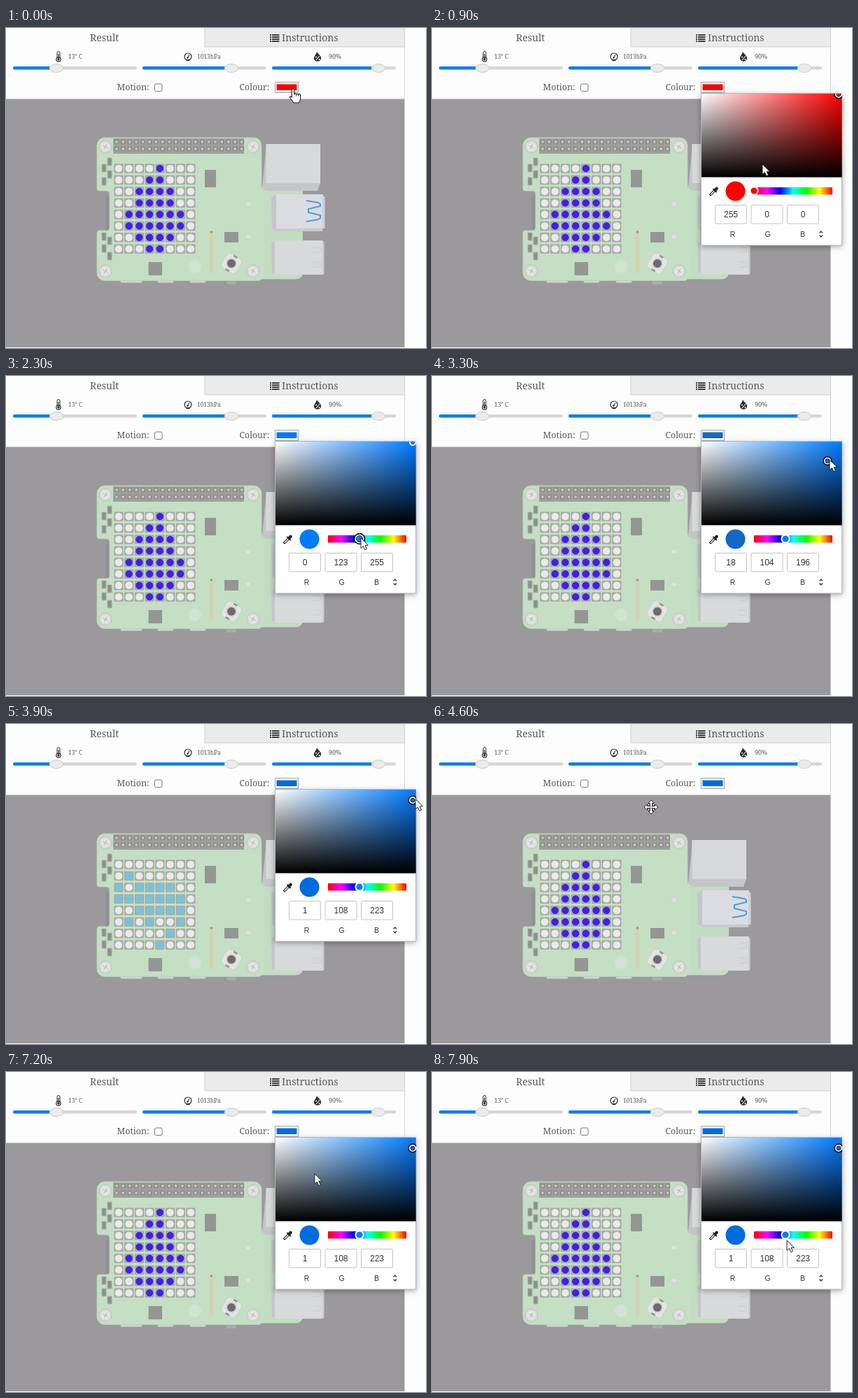
An HTML page with a canvas that plays this animation: 600x458 px, repeating every 8000 ms.

```html
<!DOCTYPE html>
<html lang="en">
<head>
<meta charset="utf-8">
<title>Board emulator</title>
<style>
html, body { margin: 0; width: 100%; height: 100%; overflow: hidden; background: #fdfdfd; }
canvas { display: block; width: 600px; height: 458px; }
</style>
</head>
<body>
<canvas id="stage"></canvas>
<script>
const W = 600, H = 458, LOOP = 8000, STEP = 100;
const SERIF = '"Noto Serif", serif', SANS = '"Liberation Sans", Arial, sans-serif';
const canvas = document.getElementById('stage');
const dpr = window.devicePixelRatio || 1;
canvas.width = W * dpr;
canvas.height = H * dpr;
const c = canvas.getContext('2d');

// LED rows as bit masks, leftmost LED is the high bit
const TREE = [0x08, 0x18, 0x3c, 0x3c, 0x7e, 0x7e, 0x3c, 0x18];
const FISH = [0x00, 0x40, 0xbc, 0xfe, 0x3e, 0x52, 0x04, 0x08];

// Pointer path: time, x, y
const PATH = [
  [0, 410, 87.5], [300, 410, 87.5], [900, 472, 195], [1600, 525, 237], [1800, 522, 235],
  [2200, 507, 232], [2400, 507, 232], [2800, 574, 106], [3300, 568, 120],
  [3700, 585, 107.5], [3900, 585, 107.5], [4600, 313, 119], [5200, 302, 150],
  [5700, 322, 148], [6400, 367, 80.5], [6700, 398, 84], [6900, 398, 84],
  [7600, 507, 241], [8000, 507, 241]
];

const clamp = (v, a, b) => Math.max(a, Math.min(b, v));

function pointer(t) {
  let i = 1;
  while (i < PATH.length - 1 && PATH[i][0] < t) i++;
  const [t0, x0, y0] = PATH[i - 1], [t1, x1, y1] = PATH[i];
  const k = clamp((t - t0) / (t1 - t0), 0, 1), e = k * k * (3 - 2 * k);
  return { x: x0 + (x1 - x0) * e, y: y0 + (y1 - y0) * e };
}

function toRgb(h, s, v) {
  const f = n => {
    const k = (n + h / 60) % 6;
    return Math.round(255 * v * (1 - s * clamp(Math.min(k, 4 - k), 0, 1)));
  };
  return [f(5), f(3), f(1)];
}
const css = rgb => `rgb(${rgb})`;

function stateAt(t) {
  const open = (t >= 400 && t < 4300) || t >= 6900;
  const p = pointer(t);
  let hueX = 460, mark = { x: 583, y: 94 };
  if (t >= 1900) hueX = pointer(Math.min(t, 2300)).x - 2;
  if (t >= 2800) {
    const d = pointer(Math.min(t, 3700));
    mark = { x: d.x - 3, y: d.y + 1.5 };
  }
  const hue = clamp(211 + (505 - hueX) * 149 / 45, 0, 360) % 360;
  const sat = clamp((mark.x - 385) / 198, 0, 1);
  const val = clamp(1 - (mark.y - 94) / 119, 0, 1);
  const onHue = t >= 1900 && t < 2800;
  const phase = t % 2400;
  return { t, open, p, hueX, mark, hue, onHue, rgb: toRgb(hue, sat, val), fish: phase >= 950 && phase < 2150 };
}

function rect(x, y, w, h, fill, r = 0, line) {
  c.beginPath();
  c.roundRect(x, y, w, h, r);
  if (fill) { c.fillStyle = fill; c.fill(); }
  if (line) { c.strokeStyle = line; c.lineWidth = 1; c.stroke(); }
}
function disc(x, y, r, fill, line, lw = 1) {
  c.beginPath();
  c.arc(x, y, r, 0, 7);
  if (fill) { c.fillStyle = fill; c.fill(); }
  if (line) { c.strokeStyle = line; c.lineWidth = lw; c.stroke(); }
}
function poly(pts, fill, line, lw = 1) {
  c.beginPath();
  for (let i = 0; i < pts.length; i += 2) c.lineTo(pts[i], pts[i + 1]);
  if (fill) { c.closePath(); c.fillStyle = fill; c.fill(); }
  if (line) { c.strokeStyle = line; c.lineWidth = lw; c.stroke(); }
}
function text(s, x, y, size, family = SERIF, align = 'left', fill = '#5a5a5a') {
  c.font = `${size}px ${family}`;
  c.textAlign = align;
  c.fillStyle = fill;
  c.fillText(s, x, y);
}

function slider(x, thumb) {
  rect(x, 55, 177, 4.5, '#d6d6d6', 2.2);
  rect(x, 55, thumb - x, 4.5, '#0b7fe9', 2.2);
  c.beginPath();
  c.ellipse(thumb, 57.5, 9.8, 6, 0, 0, 7);
  c.fillStyle = '#ebebeb';
  c.fill();
  c.strokeStyle = '#cbcbcb';
  c.lineWidth = 1;
  c.stroke();
}

function icons() {
  const ink = '#2a2a2a';
  rect(73, 33.5, 4, 11, '#fff', 2, ink);
  disc(75, 45, 3.2, '#fff', ink, 1.2);
  disc(75, 45, 1.7, ink);
  rect(74.4, 37, 1.2, 8, ink);

  disc(260, 41, 5, '#fff', ink, 1.2);
  poly([259.5, 42.5, 262, 38.5], null, ink, 1.1);
  disc(259.5, 42.5, 1.2, ink);
  rect(257.5, 45, 5, 2, ink);

  c.beginPath();
  c.moveTo(444, 34);
  c.bezierCurveTo(446, 38, 451, 40, 450, 44);
  c.bezierCurveTo(449, 49, 441, 49, 440, 44);
  c.bezierCurveTo(439.5, 41, 443, 38, 444, 34);
  c.fillStyle = ink;
  c.fill();
  poly([443, 46, 448, 40], null, '#fff', 1.1);
  disc(443, 41.5, 1, '#fff');
  disc(447.5, 45, 1, '#fff');

  for (let y = 9; y < 19; y += 3) {
    rect(377, y, 2, 2, '#3c3c3c');
    rect(380, y, 10.5, 2, '#3c3c3c');
  }
}

function header(rgb) {
  rect(0, 0, W, H, '#fdfdfd');
  rect(284, 0, 285, 27, '#ebebeb');
  rect(283.5, 0, 1, 27, '#cfcfcf');
  rect(284, 26.5, 286, 1, '#cfcfcf');
  rect(569, 0, 1, 457, '#d2d2d2');
  text('Result', 120, 19, 14);
  text('Instructions', 394, 19, 14);
  icons();
  text('13° C', 89, 44, 8.4);
  text('1013hPa', 273, 44, 8.4);
  text('90%', 461, 44, 9);
  slider(10, 72);
  slider(195, 322);
  slider(380, 532);
  text('Motion:', 158.5, 89, 12.5);
  text('Colour:', 333.5, 89, 12.3);
  rect(212.5, 80, 10.5, 10.5, '#fff', 2, '#7a7a7a');
  rect(384.5, 77.5, 33, 15, '#fcfcfc', 0, '#a2a2a2');
  rect(386.5, 80.5, 29, 8.5, css(rgb));
}

function screw(x, y) {
  disc(x, y, 9, '#d9dbd9', '#bcc3bc');
  disc(x, y, 6, '#e5e6e5');
  poly([x - 3.5, y - 2, x + 3.5, y + 2], null, '#b9bbb9', 1.3);
  poly([x - 2, y + 3.5, x + 2, y - 3.5], null, '#b9bbb9', 1.3);
}

function ports() {
  poly([372, 166, 366, 229, 372, 232, 376, 222], '#c3c4c5');
  poly([372, 222, 366, 229, 372, 233, 445, 233, 449, 222], '#c5c6c7');
  rect(371.5, 166, 77.5, 56, '#d8d9da');

  poly([387, 238, 379, 242, 380, 287, 387, 291], '#c4c6c8');
  poly([385, 285, 380, 288, 388, 291, 452, 291, 453, 285], '#c8c9cb');
  rect(386, 238, 67, 49, '#dbdcdf', 1);
  rect(452, 241, 3.5, 46, '#cfd1d4');
  poly([429, 247, 446, 250, 449, 252, 449, 255, 432, 259, 432, 264, 449, 268, 449, 272, 446, 274, 429, 277], null, '#4b9bdc', 2);

  poly([386, 304, 379, 307, 380, 350, 387, 353], '#c4c6c8');
  rect(384, 304, 69, 49, '#d8dadc', 1);
  rect(452, 306, 2.5, 46, '#cbcdd0');
  for (const y of [314, 335]) poly([438, y, 449, y, 449, y + 7, 438, y + 7], null, '#c8cacc');
}

function chips() {
  const dark = '#949694';
  [[145, 186], [137, 195], [145, 204], [137, 214],
   [137, 293], [145, 299], [137, 310], [145, 321]].forEach(([x, y]) => rect(x, y, 6, 11, '#8c908c', 0, '#aab2aa'));
  rect(284, 203, 16, 25, dark);
  rect(312, 292, 20, 15, dark);
  rect(203.5, 335, 19.5, 19, dark);
  rect(342, 248, 8, 7, '#dbe2db', 0, '#c6d2c6');
  rect(342, 295, 8, 7, '#dbe2db', 0, '#c6d2c6');
  rect(290.5, 290, 6, 60, '#d2d3b4');
  for (let y = 292; y < 350; y += 4.6) disc(293.5, y, 1.4, y < 293 ? '#888' : '#d9cf9f');
  disc(270, 342, 9, '#d3e3d3');

  c.save();
  c.translate(322, 337);
  c.rotate(0.55);
  rect(-12, -12, 24, 24, '#e4e5e3', 5, '#c9d3c9');
  for (let i = 0; i < 2; i++) {
    c.rotate(Math.PI);
    rect(-3, -12.5, 6, 2.5, '#8f938f');
  }
  c.restore();
  disc(322, 337, 8, '#d3d4d2');
  disc(322, 337, 6, '#6a6b6a');
}

function leds(fish, t) {
  const rows = fish ? FISH : TREE;
  const lit = !fish ? '#421eea' : t < 2400 ? '#f94b38' : '#70c4e6';
  for (let r = 0; r < 8; r++) for (let k = 0; k < 8; k++) {
    const x = 161 + k * 14.7, y = 201 + r * 16.45;
    rect(x - 6, y - 6, 12, 12, '#b0b4ae', 0, '#9ca199');
    disc(x, y, 5.2, rows[r] & (128 >> k) ? lit : '#ebeaea');
  }
}

function board(s) {
  rect(0, 101.5, 569, 355.5, '#9b999b');
  rect(362, 226, 62, 133.5, '#c2ddc1', [0, 0, 9, 0]);
  for (const [x, w] of [[164, 30], [217, 22], [263, 22]]) rect(x, 359, w, 5.5, '#d4d6d5', 1, '#bcbebd');
  rect(315, 360, 14, 7, '#aaaaac', 1);
  rect(143, 240, 8, 49, '#8f9092');

  c.beginPath();
  c.moveTo(140, 157);
  c.arcTo(365, 157, 365, 170, 11);
  c.arcTo(365, 361.5, 350, 361.5, 4);
  c.arcTo(130, 361.5, 130, 345, 11);
  c.lineTo(130, 293);
  c.arcTo(130, 290, 134, 290, 3);
  c.arcTo(148, 290, 148, 280, 4);
  c.arcTo(148, 233, 140, 233, 4);
  c.arcTo(130, 233, 130, 228, 3);
  c.arcTo(130, 157, 141, 157, 11);
  c.closePath();
  c.fillStyle = '#c4dfc3';
  c.fill();
  c.strokeStyle = '#b8d2b7';
  c.lineWidth = 1;
  c.stroke();
  rect(362, 230, 6, 129, '#c4dfc3');

  rect(153, 158, 187, 22, '#a0a19f');
  for (let i = 0; i < 20; i++) for (const y of [163, 173]) {
    const x = 158 + i * 9.4;
    rect(x - 3.5, y - 3.5, 7, 7, '#8f908e');
    rect(x - 1.5, y - 1.5, 3, 3, '#d2cfbd');
  }
  for (const x of [142, 353]) for (const y of [170, 348]) screw(x, y);
  chips();
  leds(s.fish, s.t);
  ports();
}

function ring(x, y, r, fill, focus) {
  if (focus) disc(x, y, r + 2.5, '#111');
  disc(x, y, r + 0.8, '#fff');
  disc(x, y, r - 1.2, fill, focus ? '#111' : null, 0.8);
}

function picker(s) {
  const fill = css(s.rgb), pure = css(toRgb(s.hue, 1, 1));
  c.save();
  c.shadowColor = 'rgba(0,0,0,.35)';
  c.shadowBlur = 8 * dpr;
  c.shadowOffsetY = 2 * dpr;
  rect(384, 93.5, 202, 217.5, '#fff');
  c.restore();
  rect(384.5, 93.5, 201, 217.5, null, 0, '#b5b5b5');

  const g = c.createLinearGradient(385, 0, 585, 0);
  g.addColorStop(0, '#fff');
  g.addColorStop(1, pure);
  rect(385, 94, 200.5, 119.5, g);
  const b = c.createLinearGradient(0, 94, 0, 213);
  b.addColorStop(0, 'rgba(0,0,0,0)');
  b.addColorStop(1, '#000');
  rect(385, 94, 200.5, 119.5, b);
  c.save();
  c.beginPath();
  c.rect(385, 94, 201, 119.5);
  c.clip();
  ring(Math.min(s.mark.x, 581), Math.max(s.mark.y, 95), 4.3, fill, !s.onHue);
  c.restore();

  // Eyedropper
  c.lineCap = 'round';
  poly([398, 238.5, 403, 233.5], null, '#222', 3.6);
  poly([398.3, 238.2, 403, 233.5], null, '#fff', 1.4);
  poly([402, 230.5, 406, 234.5], null, '#222', 2);
  poly([404.5, 232, 406.7, 229.8], null, '#222', 4.2);
  c.lineCap = 'butt';

  disc(433.5, 233.5, 14, fill);
  const h = c.createLinearGradient(460, 0, 572, 0);
  for (let i = 0; i <= 6; i++) h.addColorStop(i / 6, `hsl(${360 - i * 60},100%,50%)`);
  rect(460, 228, 112, 10.5, h, 1);
  ring(s.hueX, 233, 5.8, pure, s.onHue);

  s.rgb.forEach((v, i) => {
    const x = 404.5 + i * 51.5;
    rect(x, 253.5, 45, 26.5, '#fff', 1, '#c4c4c4');
    text(v, x + 22.5, 271, 12, SANS, 'center', '#333');
    text('RGB'[i], 429.5 + i * 50, 298.5, 10.5, SANS, 'center', '#333');
  });
  poly([553.5, 293.5, 555.8, 291, 558, 293.5], null, '#333', 1.2);
  poly([553.5, 296.5, 555.8, 299, 558, 296.5], null, '#333', 1.2);
}

function arrow() {
  poly([0, 0, 0, 14.5, 3.4, 11.5, 5.8, 16.8, 8.4, 15.6, 6, 10.5, 10.5, 10.3, 0, 0], '#fff', '#222');
}
function hand() {
  c.beginPath();
  c.moveTo(-1.6, 11);
  c.lineTo(-1.6, 1);
  c.arc(0, 1, 1.6, Math.PI, 0);
  c.lineTo(1.6, 7);
  for (const x of [1.6, 4.6, 7.6]) {
    c.quadraticCurveTo(x + 1.4, 5, x + 3, 7.2 + x / 8);
    c.lineTo(x + 3, 8.5);
  }
  c.lineTo(10.6, 14);
  c.quadraticCurveTo(10, 17, 8.5, 19.5);
  c.lineTo(0.8, 19.5);
  c.quadraticCurveTo(-1, 16, -4.6, 12);
  c.quadraticCurveTo(-5, 9, -1.6, 11.5);
  c.closePath();
  c.fillStyle = '#fff';
  c.fill();
  c.strokeStyle = '#222';
  c.lineWidth = 1.1;
  c.stroke();
}
function moveCross() {
  for (let i = 0; i < 4; i++) {
    c.save();
    c.rotate(i * Math.PI / 2);
    poly([0, -10, 4, -5.5, 1.5, -5.5, 1.5, -1.5, -1.5, -1.5, -1.5, -5.5, -4, -5.5, 0, -10], '#fff', '#222');
    c.restore();
  }
  rect(-1.5, -1.5, 3, 3, '#fff');
}

function cursor({ open, p }) {
  const { x, y } = p;
  const inPicker = open && x > 384 && x < 586 && y > 93;
  const onField = x > 333 && x < 418 && y > 77 && y < 93;
  c.save();
  c.translate(x, y);
  if (!inPicker && onField) hand();
  else if (!inPicker && y > 102 && x < 569) moveCross();
  else arrow();
  c.restore();
}

function frame(now) {
  const t = Math.floor((now % LOOP) / STEP) * STEP;
  const s = stateAt(t);
  c.setTransform(dpr, 0, 0, dpr, 0, 0);
  header(s.rgb);
  board(s);
  if (s.open) picker(s);
  cursor(s);
}

const start = performance.now();
function tick() {
  frame(performance.now() - start);
  requestAnimationFrame(tick);
}
tick();
</script>
</body>
</html>
```
